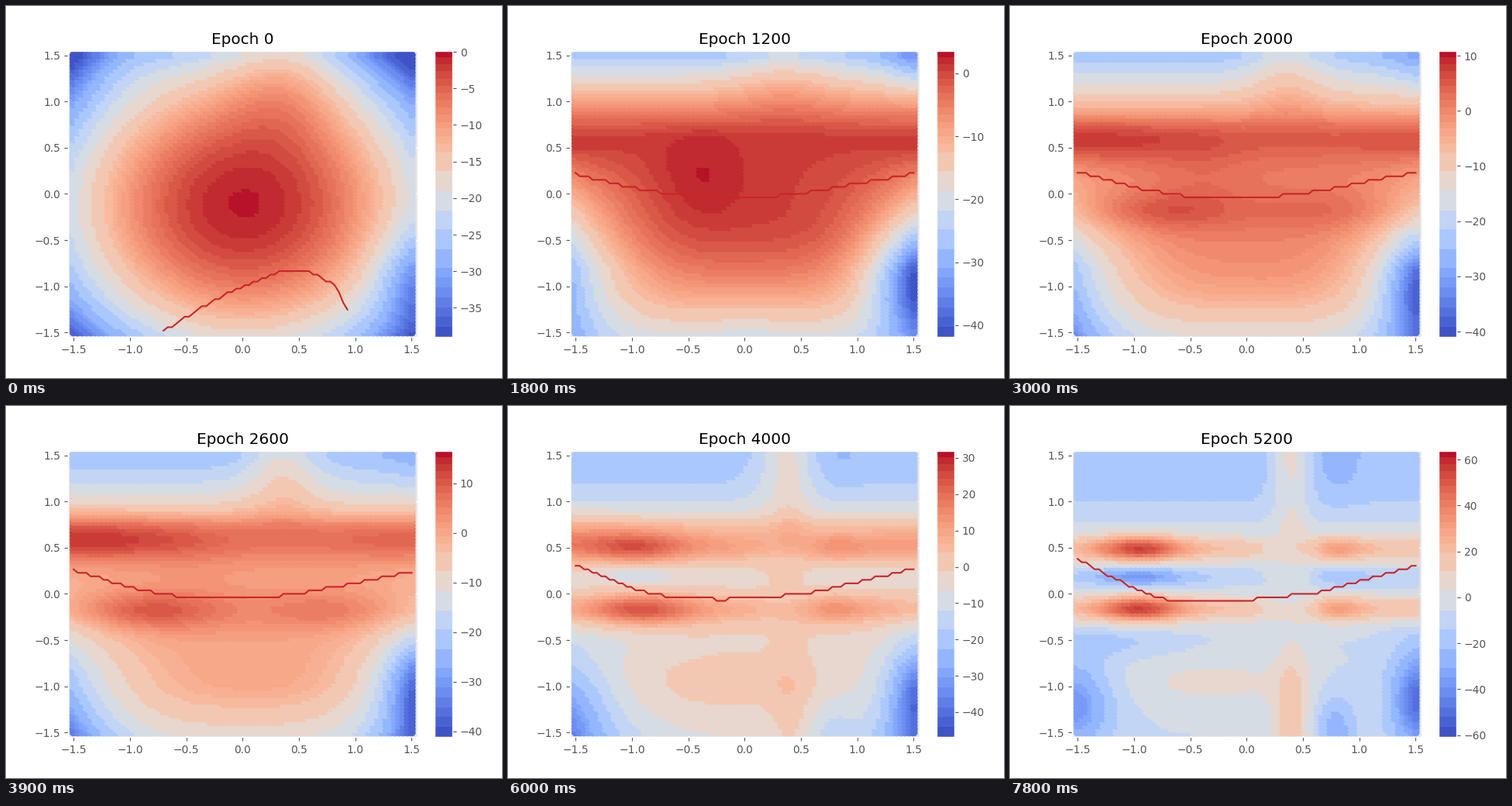
Animation of 640x480 px, one loop 8000 ms. Source, as a matplotlib script:

```python
import numpy as np
import matplotlib.pyplot as plt
from matplotlib.animation import FuncAnimation
from matplotlib.colors import ListedColormap

N = 80                      # samples per axis
STEP = 3 / (N - 1)
GRID = np.linspace(-1.5, 1.5, N)
MESH_X, MESH_Y = np.meshgrid(GRID, GRID)
NUDGE = .02                 # overlapping dots look shifted down and left
TICK_GRAY = '#555555'
FRAME_MS, LOOP_MS, HOLD_MS = 100, 8000, 300


def bell(v, center, width):
    return np.exp(-((v - center) / width)**2 / 2)


def bump(x, y, cx, cy, wx, wy):
    return bell(x, cx, wx) * bell(y, cy, wy)


def above(v, start):
    return np.maximum(v - start, 0)


# Each stage gives the surface in percent of the colour range.

def round_hill(x, y):
    return (98 - 22 * (x**2 + (y + .12)**2)
            + 17 * bump(x, y, .4, 1.4, .4, .5)
            + 10 * bump(x, y, -1.1, 1.5, .35, .3)
            - 20 * bump(x, y, 1.5, -.9, .25, .35))


def wedge(x, y):
    top = 70 * above(y, .6)**1.35
    bottom = 24 * above(-y, .15)**2 * (1 - .35 * x**2)
    sides = 13 * abs(x)**3 * np.minimum(above(-y, -.5), 1.3)
    return (93 - top - bottom - sides
            + 5 * bump(x, y, -.4, .2, .3, .35)
            + 11 * bump(x, y, .35, 1.4, .35, .35)
            - 34 * bump(x, y, 1.55, -.95, .3, .4)
            - 18 * bump(x, y, 1.55, 1.5, .2, .25))


def two_ridges(x, y):
    upper = 10 + 22 * bell(x, -1.4, .8) + 10 * bell(x, 1.5, .7)
    lower = 3 + 22 * bell(x, -.85, .45) + 12 * bell(x, .75, .45)
    top = 38 * np.tanh(1.8 * above(y, .75))
    bottom = 25 * above(-y, .95)**2
    sides = 11 * abs(x)**3 * above(-y, .2)
    return (64 - top - bottom - sides
            + upper * bell(y, .59, .17) + lower * bell(y, -.18, .15)
            + 22 * bump(x, y, .35, 1.45, .22, .4)
            + 5 * bump(x, y, .1, -.95, .5, .2)
            - 26 * bump(x, y, 1.55, -1, .2, .35))


def split_peaks(x, y):
    crest = (20 + 29 * bell(x, -.96, .27) + 12 * bell(x, .78, .17)
             - 14 * bell(x, .38, .2))
    column = 13 * abs(y) * bell(x, .39, .12)
    return (44 + column
            + crest * (bell(y, .49, .11) + bell(y, -.16, .11))
            - .75 * (crest - 12) * bell(y, .19, .075)
            - 10 * np.tanh(3 * above(y, .75))
            - 8 * bump(x, y, -1.2, -.52, .4, .12)
            + 9 * bump(x, y, -.3, -.95, .6, .2)
            - 27 * bump(x, y, -1.55, -1.2, .25, .35)
            - 38 * bump(x, y, 1.55, -1.15, .2, .4)
            - 18 * bump(x, y, .78, -1.5, .13, .3)
            - 8 * bump(x, y, .8, 1.5, .15, .3))


def path(*points):
    """Line height per column, in grid steps, through a few key points."""
    return np.interp(GRID, *zip(*points))


SURFACE_EPOCHS = [0, 1200, 3200, 5200]
SURFACES = [np.clip(stage(MESH_X - NUDGE, MESH_Y - NUDGE) / 100, 0.02, .995)
            for stage in (round_hill, wedge, two_ridges, split_peaks)]

PATH_EPOCHS = [0, 600, 3200, 5200]
PATHS = [
    path((-.7, -39), (-.13, -28), (.36, -22), (.59, -22), (.82, -26),
         (.93, -33)),
    path((-1.5, 5.2), (-.97, 1.5), (-.47, -.6), (.27, -.55), (.58, .5),
         (1.5, 5.5)),
    path((-1.5, 7.2), (-.95, 1.5), (-.6, -.8), (-.2, -1.55), (.35, -.5),
         (.6, .6), (1.5, 6.7)),
    path((-1.5, 10), (-.96, .8), (-.72, -1.5), (.05, -1.6), (.37, -.5),
         (.65, .5), (1.5, 8))]
SPAN_EPOCHS = [0, 600]
FIRST_COLUMN, LAST_COLUMN = [21, 0], [64, N - 1]

LIMIT_EPOCHS = [0, 600, 1200, 2000, 3200, 4000, 5200]
LOWS = [-39, -39.75, -41.9, -41, -41.4, -46.9, -60.9]
HIGHS = [.15, 1.96, 3.62, 10.9, 22.3, 32, 63.85]


def blend(epoch, epochs, items):
    k = min(np.searchsorted(epochs, epoch, 'right') - 1, len(items) - 2)
    mix = (epoch - epochs[k]) / (epochs[k + 1] - epochs[k])
    return items[k] + (items[k + 1] - items[k]) * mix


def banded_coolwarm():
    """Coolwarm in steps: fine at both ends, coarse around the middle."""
    edges = np.concatenate([np.linspace(0, .24, 8), np.linspace(.306, .644, 6),
                            np.linspace(.675, 1, 14)])
    middles = (edges[:-1] + edges[1:]) / 2
    shades = np.linspace(0, 1, 512, endpoint=False)
    band = np.searchsorted(edges, shades, 'right') - 1
    return ListedColormap(plt.get_cmap('coolwarm')(middles[band]))


def pixel_axes(left, width):
    ax = fig.add_axes([left / 640, 52.8 / 480, width / 640, 369.6 / 480])
    ax.tick_params(color=TICK_GRAY, labelcolor=TICK_GRAY, labelsize=10)
    for spine in ax.spines.values():
        spine.set(color='white', linewidth=1)
    return ax


plt.rcParams['font.family'] = 'DejaVu Sans'
fig = plt.figure(figsize=(6.4, 4.8), dpi=100, facecolor='white')
cmap = banded_coolwarm()

ax = pixel_axes(80, 450.6)
ax.set(xlim=(-1.549, 1.549), ylim=(-1.55, 1.55), facecolor='#E5E5E5')
ax.set_axisbelow(True)
ax.grid(color='white', linewidth=.8)
title = ax.set_title('', fontsize=14.4)
dots = ax.scatter(MESH_X.ravel(), MESH_Y.ravel(), c=np.zeros(N * N), s=56,
                  cmap=cmap, vmin=0, vmax=1, edgecolors='none')
line, = ax.plot([], [], color='#cb2429', linewidth=1.5)

bar = pixel_axes(552.9, 23.1)
bar.set_xticks([])
bar.yaxis.tick_right()
scale = bar.imshow(np.linspace(0, 1, 512)[:, None], cmap=cmap, vmin=0, vmax=1,
                   origin='lower', aspect='auto', interpolation='nearest')


def update(frame):
    epoch = 200 * (frame * FRAME_MS // HOLD_MS)
    title.set_text(f'Epoch {epoch}')
    dots.set_array(blend(epoch, SURFACE_EPOCHS, SURFACES).ravel())

    first, last = (round(np.interp(epoch, SPAN_EPOCHS, columns))
                   for columns in (FIRST_COLUMN, LAST_COLUMN))
    shown = slice(first, last + 1)
    heights = np.rint(blend(epoch, PATH_EPOCHS, PATHS)) * STEP
    line.set_data(GRID[shown], heights[shown])

    low, high = (np.interp(epoch, LIMIT_EPOCHS, limits)
                 for limits in (LOWS, HIGHS))
    scale.set_extent((0, 1, low, high))
    bar.set_ylim(low, high)
    return dots, line, scale, title


anim = FuncAnimation(fig, update, frames=LOOP_MS // FRAME_MS,
                     interval=FRAME_MS, repeat=True, repeat_delay=0)
plt.show()
```
